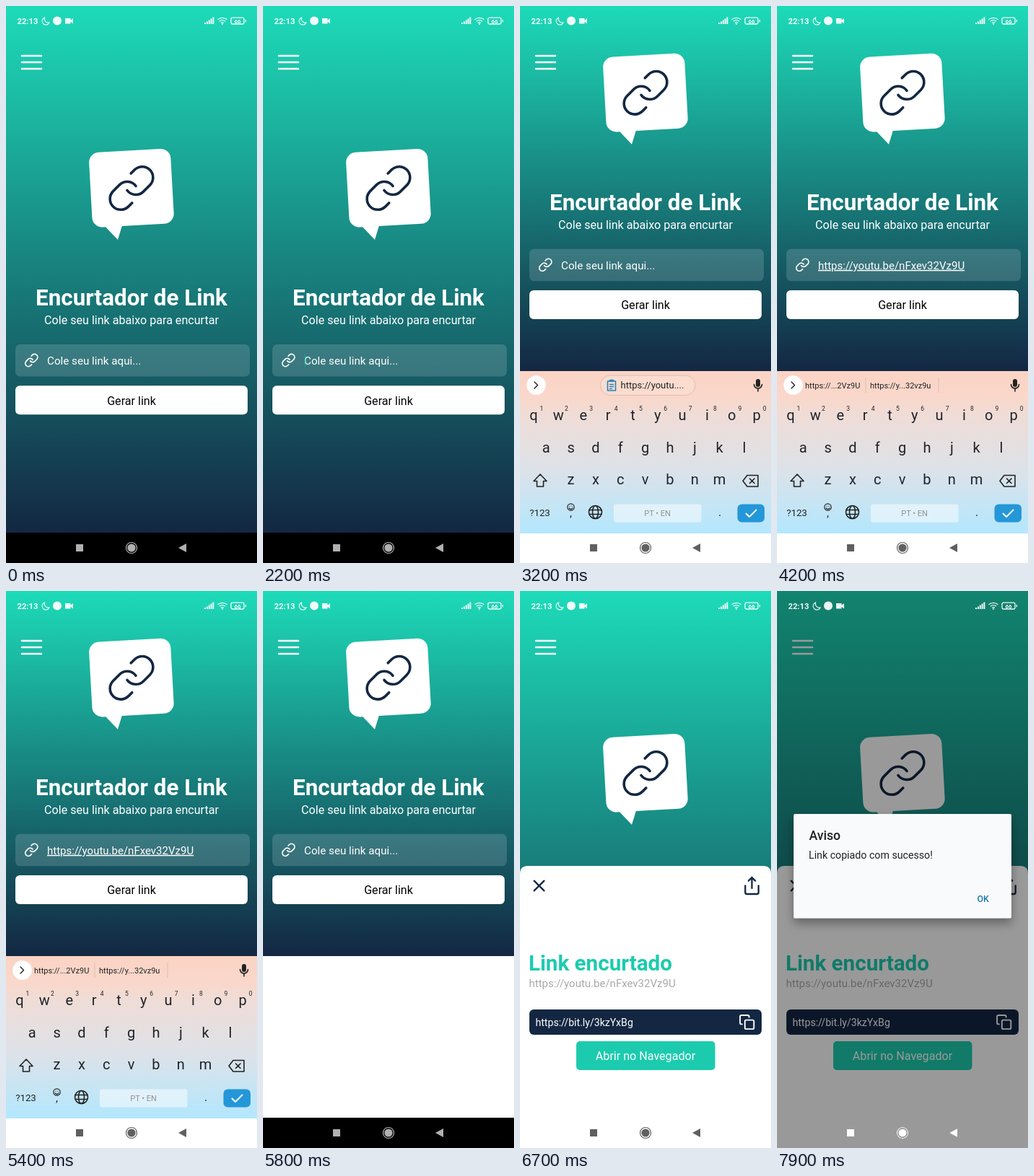
These frames come from a looping animation (348x772 px, 8 s). An HTML page:

```html
<!DOCTYPE html>
<html lang="pt">
<head>
<meta charset="utf-8">
<style>
html, body { margin: 0; width: 100%; height: 100%; overflow: hidden; }
svg { display: block; width: 348px; height: 772px; font-family: Roboto, sans-serif; }
.icon { fill: none; stroke-width: 2; stroke-linecap: round; stroke-linejoin: round; }
.bold { font-weight: 700; }
.mid { text-anchor: middle; }
</style>
</head>
<body>
<svg viewBox="0 0 348 772">
  <defs>
    <linearGradient id="sky" x2="0" y2="1">
      <stop stop-color="#1ddbb9"/><stop offset="1" stop-color="#132742"/>
    </linearGradient>
    <linearGradient id="keysFill" x2="0" y2="1">
      <stop stop-color="#fbd3c4"/><stop offset=".17" stop-color="#f9d8cb"/>
      <stop offset=".26" stop-color="#f0dcd6"/><stop offset=".6" stop-color="#dde2e8"/>
      <stop offset="1" stop-color="#b3e7fe"/>
    </linearGradient>
    <filter id="shadow" x="-10%" y="-15%" width="120%" height="140%">
      <feDropShadow dx="0" dy="7" stdDeviation="7" flood-opacity=".35"/>
    </filter>
    <g id="chain">
      <path d="M10 13a5 5 0 0 0 7.54.54l3-3a5 5 0 0 0-7.07-7.07l-1.72 1.71"/>
      <path d="M14 11a5 5 0 0 0-7.54-.54l-3 3a5 5 0 0 0 7.07 7.07l1.71-1.71"/>
    </g>
  </defs>

  <rect width="348" height="772" fill="#fff"/>
  <rect id="back" width="348" height="730" fill="url(#sky)"/>
  <path d="M22 69H49M22 78H49M22 87H49" stroke="#fff" stroke-width="2.6" stroke-linecap="round"/>

  <g id="home">
    <g fill="#fff">
      <rect x="117.2" y="200.3" width="113.4" height="104" rx="14" transform="rotate(-3.2 173.9 252.3)"/>
      <path d="M135 303L155 324L162 301Z"/>
    </g>
    <use href="#chain" class="icon" stroke="#132742" style="stroke-width:1.2" transform="translate(138 216.5) scale(3)"/>
    <text class="bold mid" x="174" y="415" font-size="31.4" fill="#fff">Encurtador de Link</text>
    <text class="mid" x="174" y="440.8" font-size="16.1" fill="#fff">Cole seu link abaixo para encurtar</text>
    <rect x="13" y="469" width="325" height="44.5" rx="6.5" fill="#fff" fill-opacity=".15"/>
    <use href="#chain" class="icon" stroke="#fff" transform="translate(25 480.7) scale(.86)"/>
    <text id="hint" x="57" y="497" font-size="15.2" fill="#fff">Cole seu link aqui...</text>
    <text id="typed" x="57" y="497" font-size="15" fill="#fff" text-decoration="underline">https://youtu.be/nFxev32Vz9U</text>
    <rect id="caret" x="57" y="482" width="1.5" height="18" fill="#1a9c90"/>
    <g id="button">
      <rect x="13" y="526.2" width="322" height="40" rx="6" fill="#fff"/>
      <text class="mid" x="174" y="552.5" font-size="16.1">Gerar link</text>
    </g>
  </g>

  <g id="sheet">
    <path d="M0 772V392Q0 381 11 381H337Q348 381 348 392V772Z" fill="#fff"/>
    <path class="icon" stroke="#132742" transform="translate(12.7 394.7) scale(1.15)" d="M18 6L6 18M6 6L18 18"/>
    <path class="icon" stroke="#132742" transform="translate(307.7 394.7) scale(1.15)"
      d="M4 12v8a2 2 0 0 0 2 2h12a2 2 0 0 0 2-2v-8M16 6L12 2L8 6M12 2V15"/>
    <text class="bold" x="12" y="525.5" font-size="29.6" fill="#1ccbae">Link encurtado</text>
    <text x="12.5" y="549" font-size="15" fill="#a9a9a9">https://youtu.be/nFxev32Vz9U</text>
    <rect x="13" y="580" width="322" height="35" rx="6" fill="#132742"/>
    <text x="21.5" y="603" font-size="14.1" fill="#fff">https://bit.ly/3kzYxBg</text>
    <g class="icon" stroke="#fff" transform="translate(303.2 586) scale(.96)">
      <rect x="9" y="9" width="13" height="13" rx="2"/>
      <path d="M5 15H4a2 2 0 0 1-2-2V4a2 2 0 0 1 2-2h9a2 2 0 0 1 2 2v1"/>
    </g>
    <rect x="78" y="624" width="192.5" height="40" rx="5" fill="#1ccbae"/>
    <text class="mid" x="174" y="650" font-size="16.1" fill="#fff">Abrir no Navegador</text>
  </g>

  <rect id="nav" y="730" width="348" height="42"/>
  <g id="keyboard">
    <rect y="506" width="348" height="225" fill="url(#keysFill)"/>
    <g id="keys" fill="#202328"></g>
    <circle cx="22.5" cy="525.5" r="13.3" fill="#fff"/>
    <path d="M20 521l4.5 4.5l-4.5 4.5" class="icon" stroke="#333" style="stroke-width:1.6"/>
    <g id="clip">
      <rect x="111.5" y="512" width="131.5" height="27.5" rx="13.7" fill="#fbdccf" stroke="#dcbfb3"/>
      <g class="icon" stroke="#2087bd" style="stroke-width:1.6">
        <path d="M121.500 520H132.500V533H121.500ZM124.500 524.500h5M124.500 527.500h5M124.500 530.500h3"/>
        <path d="M125 519.300h4" style="stroke-width:3"/>
      </g>
      <text x="139.500" y="530" font-size="13" fill="#222">https://youtu....</text>
    </g>
    <g id="words" font-size="11" fill="#222">
      <text x="39" y="530">https://...2Vz9U</text>
      <text x="129" y="530">https://y...32vz9u</text>
      <path d="M123 515V536M224 515V536" stroke="#dcbfb3"/>
    </g>
    <rect x="327" y="517" width="6" height="11" rx="3" fill="#222"/>
    <path d="M324.500 524.500a5.500 5.500 0 0 0 11 0M330 530v4" class="icon" stroke="#222" style="stroke-width:1.6"/>
    <g class="icon" stroke="#222" style="stroke-width:1.6">
      <path d="M28 649L37 658.500H32.500V666H23.500V658.500H19Z"/>
      <path d="M315 650.500H330V666H315L309 658.200ZM318.500 655l6.500 6.500M325 655l-6.500 6.500"/>
      <g style="stroke-width:1.2">
        <circle cx="70.500" cy="694.500" r="4.700"/>
        <path d="M68 696q2.500 2.500 5 0M69 693v.2M72 693v.2"/>
      </g>
      <circle cx="104.500" cy="701.500" r="9"/>
      <ellipse cx="104.500" cy="701.500" rx="4" ry="9"/>
      <path d="M96.500 698.500h16M96.500 704.500h16"/>
    </g>
    <rect x="130" y="690.500" width="121.500" height="25" rx="3" fill="#fff" fill-opacity=".5"/>
    <rect x="301.500" y="690.500" width="37.500" height="25" rx="6" fill="#2497d9"/>
    <path d="M313.500 703.500l4.500 4.500l9.500-9.500" class="icon" stroke="#fff"/>
  </g>
  <g id="navIcons">
    <rect x="97" y="746" width="10" height="10"/>
    <circle cx="174" cy="751" r="5.600"/>
    <circle cx="174" cy="751" r="7.500" class="ring" fill="none" stroke-width="1.200"/>
    <path d="M239 751L250 745V757Z"/>
  </g>

  <g id="alert">
    <rect width="348" height="772" opacity=".4"/>
    <rect x="23" y="309" width="302" height="144.500" rx="2" fill="#f9fafc" filter="url(#shadow)"/>
    <text x="44.500" y="344.500" font-size="17.600" font-weight="500" fill="#202124">Aviso</text>
    <text x="44" y="371" font-size="14.200" fill="#202124">Link copiado com sucesso!</text>
    <text x="277.500" y="431.300" font-size="12.400" font-weight="500" fill="#1c78ab">OK</text>
    <g fill="#fff">
      <rect x="97" y="746" width="10" height="10"/>
      <circle cx="174" cy="751" r="5.600"/>
      <circle cx="174" cy="751" r="7.500" fill="none" stroke="#fff" stroke-width="1.200"/>
      <path d="M239 751L250 745V757Z"/>
    </g>
  </g>

  <g fill="#fff" opacity=".93">
    <text class="bold" x="15.500" y="25" font-size="11.200">22:13</text>
    <path d="M53.500 16a5.200 5.200 0 1 0 6.500 7a5.500 5.500 0 0 1-6.500-7z" fill="none" stroke="#fff" stroke-width="1.100"/>
    <circle cx="71" cy="20.500" r="6"/>
    <path d="M82 17h7.500v2.700l3.500-2.700v7.500l-3.500-2.700v2.700h-7.500z"/>
    <path d="M275 23h2v2h-2zM278 21.500h2v3.500h-2zM280.800 19.500h2v5.500h-2zM283.600 17.500h2v7.500h-2zM286.400 15.500h2v9.500h-2z"/>
    <g fill="none" stroke="#fff" stroke-width="1.300">
      <path d="M293.500 18.800q6.500-5 13 0M295.800 21.200q4.200-3.300 8.400 0M298 23.500q2-1.600 4 0"/>
      <rect x="312" y="16.200" width="18" height="8.800" rx="2.200"/>
      <path d="M332.300 19v3.300"/>
    </g>
    <circle cx="300" cy="25" r="1"/>
    <text class="bold mid" x="321" y="23.600" font-size="8">66</text>
  </g>
</svg>

<script>
const LOOP = 8000, KEYBOARD_HEIGHT = 266, FIELD_SHIFT = -132.2;
const el = id => document.getElementById(id);
const show = (id, on) => el(id).setAttribute('display', on ? 'inline' : 'none');
const moveY = (id, y) => el(id).setAttribute('transform', `translate(0 ${y})`);
const progress = (t, start, length) => Math.min(1, Math.max(0, (t - start) / length));
const easeOut = p => 1 - (1 - p) ** 3;

function addKey(label, x, y, size) {
  const key = document.createElementNS('http://www.w3.org/2000/svg', 'text');
  key.setAttribute('class', 'mid');
  key.setAttribute('x', x);
  key.setAttribute('y', y);
  key.setAttribute('font-size', size);
  key.textContent = label;
  el('keys').append(key);
}

[['qwertyuiop', 19], ['asdfghjkl', 36.2], ['zxcvbnm', 70.5]].forEach(([letters, left], row) => {
  [...letters].forEach((letter, i) => {
    const x = left + i * 34.35;
    addKey(letter, x, 574 + row * 44.5, 20);
    if (row === 0) addKey((i + 1) % 10, x + 11, 560.5, 8.5);
  });
});
addKey('?123', 27.5, 706.5, 13.3);
addKey(',', 70.5, 708, 15);
addKey('PT • EN', 190.5, 707, 11);
addKey('.', 277, 707, 16);

function draw(t) {
  const raised = t >= 2260 && t < 5850;
  moveY('home', raised ? FIELD_SHIFT : 0);
  el('back').setAttribute('height', raised ? 506 : 730);

  const pasted = t >= 3300 && t < 5500;
  show('typed', pasted);
  show('hint', !pasted);
  show('caret', t >= 2200 && t < 2300);
  el('button').setAttribute('opacity', t >= 5200 && t < 5400 ? 0.6 : 1);

  const rise = easeOut(progress(t, 2250, 220));
  const fall = progress(t, 5550, 220) ** 2;
  moveY('keyboard', KEYBOARD_HEIGHT * (1 - rise + fall));
  show('keyboard', t >= 2250 && t < 5770);
  show('clip', t < 3300);
  show('words', t >= 3300);

  show('sheet', t >= 5820);
  moveY('sheet', 391 * (1 - easeOut(progress(t, 5820, 270))));

  const lightNav = (t >= 2300 && t < 5700) || t >= 5900;
  el('nav').setAttribute('fill', lightNav ? '#fff' : '#000');
  const iconColor = lightNav ? '#606060' : '#b0b0b0';
  el('navIcons').setAttribute('fill', iconColor);
  document.querySelector('.ring').setAttribute('stroke', iconColor);

  el('alert').setAttribute('opacity', progress(t, 7710, 150));
}

function tick(now) {
  draw(now % LOOP);
  requestAnimationFrame(tick);
}
draw(0);
requestAnimationFrame(tick);
</script>
</body>
</html>
```
